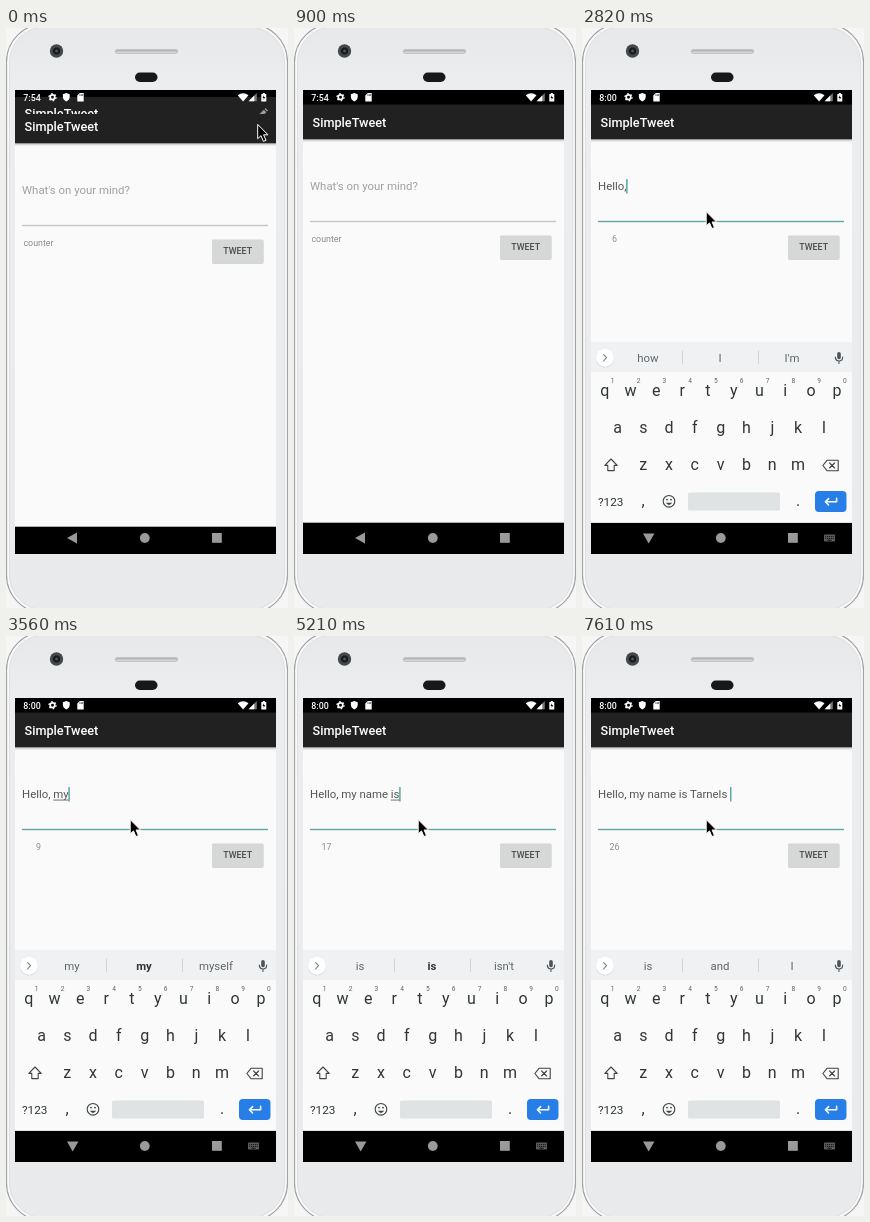
An HTML page for the animation above (8000 ms loop, 282 by 580 pixels).

```html
<!DOCTYPE html>
<html lang="en">
<head>
<meta charset="utf-8">
<title>Compose screen</title>
<style>
  html, body { margin: 0; width: 100%; height: 100%; overflow: hidden; background: #f6f6f6; }
  svg { display: block; width: 282px; height: 580px; font-family: Roboto, sans-serif; }
  text { white-space: pre; }
  .mid { text-anchor: middle; }
  .bar { font-size: 12.7px; font-weight: 500; fill: #fff; }
  .body { font-size: 11.4px; }
  .small { font-size: 8.9px; }
  .key { font-size: 16px; fill: #2f3538; text-anchor: middle; }
  .alt { font-size: 6.6px; fill: #5b6367; text-anchor: middle; }
  .line { fill: none; stroke: #3c4346; stroke-width: 1.1; stroke-linejoin: round; stroke-linecap: round; }
</style>
</head>
<body>
<svg viewBox="0 0 282 580">
  <defs>
    <clipPath id="reveal"><rect id="revealBox" x="9" y="62" width="261" height="464"/></clipPath>
    <linearGradient id="shade" x2="0" y2="1">
      <stop stop-color="#000" stop-opacity=".25"/><stop offset="1" stop-color="#000" stop-opacity="0"/>
    </linearGradient>
    <linearGradient id="shell" x2="0" y2="1">
      <stop stop-color="#e6e8ea"/><stop offset=".1" stop-color="#ebedee"/><stop offset="1" stop-color="#e8eaeb"/>
    </linearGradient>
  </defs>

  <!-- Phone shell -->
  <rect x=".5" y="-4" width="281" height="589" rx="38" fill="#f9f9f9" stroke="#a2a3a5" stroke-width="1.2"/>
  <rect x="3.5" y="-1" width="275" height="583" rx="35" fill="url(#shell)" stroke="#d8dadc" stroke-width=".8"/>
  <circle cx="50.5" cy="23" r="6.7" fill="#45484b"/>
  <circle cx="50.5" cy="23" r="3.6" fill="#17191c"/>
  <circle cx="50.5" cy="23" r="1.4" fill="#4a5560"/>
  <rect x="109" y="21.3" width="63" height="4.6" rx="2.3" fill="#b4b6b9"/>
  <rect x="110" y="23.6" width="61" height="2" rx="1" fill="#d3d5d7"/>
  <rect x="129" y="44.5" width="22.5" height="9.5" rx="4.75" fill="#17181a"/>
  <rect x="9" y="62" width="261" height="464"/>

  <!-- Leaving screen -->
  <g id="leaving">
    <rect x="9" y="69" width="261" height="36" fill="#212121"/>
    <text x="18.5" y="90.3" class="bar">SimpleTweet</text>
    <path d="M252 90v-2.5l5.8-5.8 2.5 2.5-5.8 5.8zM258.5 81l1-1 2.5 2.5-1 1z" fill="#9a9a9a"/>
  </g>

  <!-- Compose screen -->
  <g clip-path="url(#reveal)">
    <g id="compose">
      <rect x="9" y="62" width="261" height="14.5"/>
      <rect x="9" y="111" width="261" height="383.7" fill="#fafafa"/>
      <rect x="9" y="111.2" width="261" height="3" fill="url(#shade)"/>
      <rect x="9" y="76.5" width="261" height="34.8" fill="#212121"/>
      <text x="18.5" y="98.7" class="bar">SimpleTweet</text>
      <text id="hint" x="16" y="162.3" class="body" fill="#a0a0a0">What's on your mind?</text>
      <text id="typed" x="16" y="162.3" class="body" fill="#555"></text>
      <rect id="under" y="163.6" height=".9" fill="#666"/>
      <rect id="caret" y="151" width="1.3" height="14.5" fill="#3f9c92"/>
      <rect id="rule" x="16" y="192.8" width="246" height="1.4"/>
      <text id="count" x="32.5" y="213.6" class="small mid" fill="#8c8c8c"></text>
      <rect x="206" y="208.6" width="51.5" height="23.4" rx="1.4" fill="#bdbdbd" opacity=".6"/>
      <rect x="206" y="207.6" width="51.5" height="23.4" rx="1.4" fill="#d6d7d7"/>
      <text x="231.7" y="222.4" class="small mid" font-weight="500" fill="#4a4a4a">TWEET</text>
    </g>
  </g>

  <!-- Status bar -->
  <g fill="#fff">
    <text id="clock" x="17.3" y="72.5" class="small" font-weight="500"></text>
    <circle cx="46.5" cy="69.2" r="2.3" fill="none" stroke="#fff" stroke-width="1.7"/>
    <circle cx="46.5" cy="69.2" r="3.5" fill="none" stroke="#fff" stroke-width="1.3" stroke-dasharray="1.6 2.065"/>
    <path d="M60.3 65l3.4 1.3v2.5q0 3-3.4 4.7q-3.4-1.7-3.4-4.7v-2.5z"/>
    <path d="M73.7 65h4v8.4h-6.4v-6z"/>
    <path d="M73.9 66.2v1.7M75.3 66.2v1.7M76.6 66.2v1.7" stroke="#000" stroke-width=".6"/>
    <path d="M231.7 67.2q5.4-3.8 10.8 0l-5.4 6.2z"/>
    <path d="M250.8 65v8.2h-8.2z" fill="#777"/>
    <path d="M248.3 67.5v5.7h-5.7z"/>
    <path d="M256.8 65h2v.9h1.5v7.5h-5v-7.5h1.5z"/>
    <path d="M258 67.2l-1.4 2.7h1.1v2l1.4-2.8h-1.1z" fill="#000"/>
  </g>

  <!-- Navigation bar -->
  <g fill="#9a9a9a">
    <path id="back"/>
    <circle cx="138.8" cy="510" r="4.9"/>
    <rect x="206" y="505" width="9.8" height="9.8"/>
  </g>

  <!-- Keyboard -->
  <g id="keyboard">
    <rect x="9" y="314" width="261" height="180.7" fill="#fafafa"/>
    <rect x="9" y="314" width="261" height="30" fill="#f0f1f2"/>
    <circle cx="23" cy="330.3" r="9.2" fill="#d5d8da"/>
    <circle cx="23" cy="329.7" r="9" fill="#fff"/>
    <path d="M21.6 326.6l3 3.1-3 3.1" class="line" style="stroke:#7b8285"/>
    <path d="M100.5 322.5v14M176.5 322.5v14" stroke="#d2d5d7"/>
    <rect x="255.2" y="324" width="3.6" height="7.2" rx="1.8" fill="#4d5457"/>
    <path d="M253.3 329q0 4 3.7 4t3.7-4M257 333v2.4" class="line" style="stroke:#4d5457"/>
    <g id="words" class="body mid"></g>
    <g id="keys"></g>
    <path d="M29 431l6.2 6.4h-3v5.2h-6.4v-5.2h-3z" class="line"/>
    <path d="M245.2 432.2h11v10.6h-11l-4.3-5.3zM247.6 435l5 5M252.6 435l-5 5" class="line"/>
    <text x="16" y="477.6" font-size="11.8" fill="#2f3538">?123</text>
    <text x="61" y="477.8" class="key">,</text>
    <text x="216" y="477.8" class="key">.</text>
    <circle cx="87" cy="473.3" r="5.8" class="line"/>
    <path d="M83.8 474.8q3.2 4.2 6.4 0z" fill="#3c4346"/>
    <circle cx="85" cy="471.6" r=".95" fill="#3c4346"/>
    <circle cx="89" cy="471.6" r=".95" fill="#3c4346"/>
    <rect x="106" y="464.5" width="92" height="18" rx="1.5" fill="#e0e3e4"/>
    <rect x="233" y="463" width="31.5" height="21" rx="4" fill="#267ee6"/>
    <path d="M254.6 470.2v3.6h-11M246.6 470.6l-3.2 3.2 3.2 3.2" class="line" style="stroke:#fff;stroke-width:1.5"/>
    <g fill="#5c5c5c">
      <rect x="242" y="506.5" width="11" height="7" rx=".8"/>
      <path d="M243.3 508.6h8.4M243.3 510.4h8.4" stroke="#000" stroke-width=".9" stroke-dasharray="1 .85"/>
      <path d="M245.3 512.2h4.4" stroke="#000" stroke-width=".8"/>
    </g>
  </g>

  <path id="cursor" d="M0 0V14.3L3.3 11.3L5.7 17L8.3 15.9L5.9 10.4H10.3Z" fill="#000" stroke="#fff" stroke-width="1" stroke-linejoin="round"/>
</svg>

<script>
const LOOP = 8000;
const KEYBOARD_AT = 1200;
const $ = id => document.getElementById(id);
const pen = document.createElement('canvas').getContext('2d');
pen.font = '11.4px Roboto, sans-serif';
const widthOf = s => pen.measureText(s).width;

// time, window offset, top of the revealed part, cursor x, y
const opening = [
  [0, 4, 86, 251.7, 96.4],
  [150, 1.5, 79, 251, 120],
  [300, 0, 62, 246, 190],
  [450, 0, 62, 234, 310],
  [600, 0, 62, 218, 450],
  [750, 0, 62, 204, 562],
  [900, 0, 62, 204, 620],
  [KEYBOARD_AT, 0, 62, 124.2, 183.6]
];

// time, typed text, suggestions (a leading * is bold)
const typing = [
  [0, '', "I|The|I'm"],
  [1790, 'H', 'H|Have|Hello'],
  [2090, 'He', 'He|*He|Hey'],
  [2240, 'Hel', 'Hel|*Hello|Help'],
  [2380, 'Hell', 'Hell|*Hello|Hells'],
  [2520, 'Hello', 'Hello|*Hello|Hellos'],
  [2820, 'Hello,', "how|I|I'm"],
  [2960, 'Hello, ', "how|I|I'm"],
  [3410, 'Hello, m', 'm|*my|me'],
  [3560, 'Hello, my', 'my|*my|myself'],
  [3860, 'Hello, my ', 'my|*my|myself'],
  [4010, 'Hello, my ', 'name|friend|phone'],
  [4310, 'Hello, my n', 'n|*name|new'],
  [4460, 'Hello, my na', 'na|*name|nap'],
  [4610, 'Hello, my nam', 'nam|*name|names'],
  [4760, 'Hello, my name', 'name|*name|names'],
  [4910, 'Hello, my name ', 'is|and|was'],
  [5060, 'Hello, my name i', 'i|*is|in'],
  [5210, 'Hello, my name is', "is|*is|isn't"],
  [5660, 'Hello, my name is T', 'T|*The|To'],
  [5810, 'Hello, my name is Ta', 'Ta|*Take|Talk'],
  [5960, 'Hello, my name is Tar', 'Tar|*Tarno|Target'],
  [6110, 'Hello, my name is Tarn', 'Tarn|*Tarno|Meldren'],
  [6260, 'Hello, my name is Tarne', 'Tarne|*Tarnels|Tarno'],
  [6410, 'Hello, my name is Tarnels', 'Tarnels|*Tarnels|Tarno'],
  [6710, 'Hello, my name is Tarnels ', 'is|and|I']
];
const caretOff = [[1490, 1790], [7160, 7610]];

const at = (table, t) => table.findLast(row => row[0] <= t);
const put = (node, attrs) => {
  for (const name in attrs) node.setAttribute(name, attrs[name]);
};
const show = (node, on) => put(node, { visibility: on ? 'visible' : 'hidden' });

function addText(parent, x, y, string, attrs) {
  const node = document.createElementNS('http://www.w3.org/2000/svg', 'text');
  put(node, { x, y, ...attrs });
  node.textContent = string;
  parent.append(node);
  return node;
}

[['qwertyuiop', 22.7, 367.5], ['asdfghjkl', 35.5, 404.6], ['zxcvbnm', 61.2, 442.3]]
  .forEach(([letters, x0, y], row) => [...letters].forEach((letter, i) => {
    const x = x0 + i * 25.8;
    addText($('keys'), x, y, letter, { class: 'key' });
    if (!row) addText($('keys'), x + 8, 355, (i + 1) % 10, { class: 'alt' });
  }));
const words = [66, 138, 210].map(x => addText($('words'), x, 334, ''));

function drawTyping(t) {
  const [, text, choices] = at(typing, t);
  const open = t >= KEYBOARD_AT;
  const word = text.match(/\w*$/)[0];
  const end = widthOf(text);
  $('typed').textContent = text;
  show($('hint'), !text);
  put($('under'), { x: 16 + end - widthOf(word), width: widthOf(word) });
  put($('caret'), { x: 15.8 + end });
  show($('caret'), open && !caretOff.some(([a, b]) => t >= a && t < b));
  $('count').textContent = text.length || 'counter';
  choices.split('|').forEach((choice, i) => {
    const bold = choice[0] === '*';
    words[i].textContent = choice.replace('*', '');
    put(words[i], { 'font-weight': bold ? 700 : 400, fill: bold ? '#2f3538' : '#5f676b' });
  });
}

function draw(t) {
  const [, shift, top, x, y] = at(opening, t);
  const open = t >= KEYBOARD_AT;
  put($('compose'), { transform: `translate(0 ${shift})` });
  put($('revealBox'), { y: top, height: 526 - top });
  put($('cursor'), { transform: `translate(${x} ${y})` });
  put($('rule'), { fill: open ? '#5fa8a0' : '#c6c6c6' });
  put($('back'), { d: open ? 'M61 505.5h11.4l-5.7 10z' : 'M71 504.5v11l-10-5.5z' });
  show($('leaving'), top > 62);
  show($('keyboard'), open);
  $('clock').textContent = open ? '8:00' : '7:54';
  drawTyping(t);
}

const start = performance.now();
function tick() {
  draw((performance.now() - start) % LOOP);
  requestAnimationFrame(tick);
}
tick();
</script>
</body>
</html>
```
